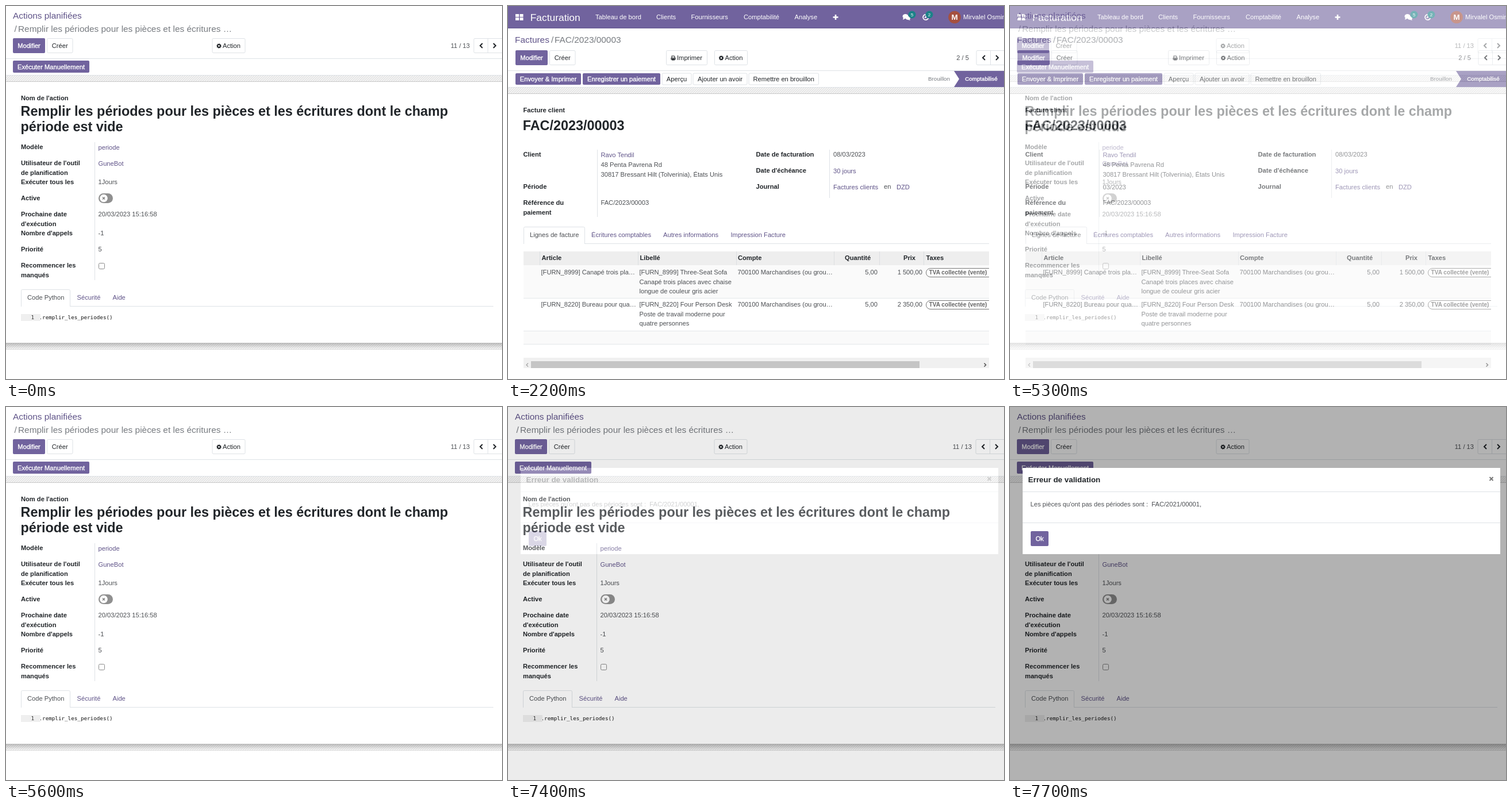
Write an HTML page that moves like this. It is 863 px wide and 649 px high and loops after 8000 ms.

```html
<!DOCTYPE html>
<html lang="fr">
<head>
<meta charset="utf-8">
<title>Actions planifiées</title>
<style>
html, body { margin: 0; width: 100%; height: 100%; overflow: hidden; background: #fff; }
svg { display: block; }
text { font: 11.15px "Liberation Sans", Arial, sans-serif; white-space: pre; }
.b { font-weight: 700; }
.crumb { font-size: 15.4px; }
.h1 { font-size: 23.4px; font-weight: 700; }
.app { font-size: 17.4px; }
.title { font-size: 13.4px; font-weight: 700; }
.small { font-size: 9.75px; }
.tiny { font-size: 8px; }
.tax { font-size: 10.1px; font-weight: 700; }
.code { font: 9.25px "DejaVu Sans Mono", monospace; }
.strong { stroke: #fff; stroke-width: .35px; }
.mid { text-anchor: middle; }
.end { text-anchor: end; }
</style>
</head>
<body>
<svg id="stage" width="863" height="649" viewBox="0 0 863 649"></svg>
<script>
const PURPLE = '#71639e', LINK = '#5f5388', INK = '#212529', BODY = '#4c4f53', EDGE = '#dee2e6', MUTED = '#777b80';

const text = (x, y, s, fill = BODY, cls = '') => `<text x="${x}" y="${y}" fill="${fill}" class="${cls}">${s}</text>`;
const label = (x, y, ...lines) => lines.map((s, i) => text(x, y + i * 17, s, INK, 'b')).join('');
const rect = (x, y, w, h, fill, more = '') => `<rect x="${x}" y="${y}" width="${w}" height="${h}" fill="${fill}" ${more}/>`;
const frame = (x, y, w, h, r = 2, stroke = EDGE) => rect(x + .5, y + .5, w - 1, h - 1, '#fff', `rx="${r}" stroke="${stroke}"`);
const hline = (x, y, w, c = EDGE) => rect(x, y, w, 1, c);
const vline = (x, y, h, c = EDGE) => rect(x, y, 1, h, c);
const path = (d, stroke, width = 1, fill = 'none') => `<path d="${d}" fill="${fill}" stroke="${stroke}" stroke-width="${width}"/>`;
const dot = (x, y, r, fill) => `<circle cx="${x}" cy="${y}" r="${r}" fill="${fill}"/>`;

function button(x, y, w, h, s, primary, shift = 0) {
  const box = primary ? rect(x, y, w, h, PURPLE, 'rx="2"') : frame(x, y, w, h);
  return box + text(x + w / 2 + shift, y + h / 2 + 4, s, primary ? '#fff' : INK, primary ? 'mid strong' : 'mid');
}

function gear(x, y) {
  return `<g fill="none" stroke="${INK}"><circle cx="${x}" cy="${y}" r="2.4" stroke-width="2"/>
    <circle cx="${x}" cy="${y}" r="3.6" stroke-width="1.2" stroke-dasharray="1.41 1.41"/></g>`;
}

function printer(x, y) {
  return path(`M${x - 2.5} ${y}v-3.5h4l1 1v2.5M${x - 3.5} ${y + 2.5}v-2.5h7v2.5zM${x - 2} ${y + 1.5}h4v2h-4z`, INK, 1.1);
}

// Toolbar shared by both pages: dx, y give its place.
function toolbar(dx, y, count) {
  const cy = y + 13;
  return button(12 + dx, y, 56, 26, 'Modifier', true) + button(71 + dx, y, 45.5, 26, 'Créer')
    + button(358.5 + dx / 2, y, 58, 26, 'Action', false, 5) + gear(370.5 + dx / 2, cy + .5)
    + text(807 + (dx ? -5 : 0), cy + 3.5, count, BODY, 'end')
    + frame(813.5 + dx, y, 60, 26) + vline(838 + dx, y, 26)
    + path(`M${829 + dx} ${cy - 4}l-4 4l4 4M${848 + dx} ${cy - 4}l4 4l-4 4`, INK, 2);
}

function tabs(x, y, w, right, names) {
  const [first, ...rest] = names;
  return hline(x, y + 29, right - x) + path(`M${x + .5} ${y + 30}v-27.5q0-2 2-2h${w - 5}q2 0 2 2v27.5`, EDGE, 1, '#fff')
    + text(x + 11, y + 18, first) + rest.map(([tx, s]) => text(tx, y + 18, s, LINK)).join('');
}

const backdrop = (y, h) => rect(0, y, 863, h, 'url(#weave)');

const actionPage = () => rect(0, 0, 863, 649, '#fff')
  + text(12, 22, 'Actions planifiées', LINK, 'crumb')
  + text(14.5, 45, '/', MUTED, 'crumb') + text(21, 45, 'Remplir les périodes pour les pièces et les écritures …', MUTED, 'crumb')
  + toolbar(0, 56, '11 / 13') + hline(0, 91, 863)
  + button(12, 95, 133, 21, 'Exécuter Manuellement', true)
  + hline(0, 120, 863) + backdrop(121, 10) + hline(0, 131, 863, '#c9c9c9')
  + label(26, 164, "Nom de l'action")
  + text(25.5, 190.5, 'Remplir les périodes pour les pièces et les écritures dont le champ', INK, 'h1')
  + text(25.5, 217.5, 'période est vide', INK, 'h1')
  + label(26, 249, 'Modèle') + label(26, 277, "Utilisateur de l'outil", 'de planification')
  + label(26, 310, 'Exécuter tous les') + label(26, 338, 'Active')
  + label(26, 366, 'Prochaine date', "d'exécution") + label(26, 399, "Nombre d'appels")
  + label(26, 427, 'Priorité') + label(26, 455, 'Recommencer les', 'manqués')
  + vline(154, 237, 240)
  + text(160.5, 250, 'periode', LINK) + text(160.5, 278, 'GuneBot', LINK)
  + text(160.5, 310, '1Jours') + text(160.5, 366, '20/03/2023 15:16:58')
  + text(160.5, 399, '-1') + text(160.5, 427, '5')
  + rect(161, 326, 25, 17, '#909090', 'rx="8.5"') + dot(170, 334.5, 6.8, '#fff')
  + path('M168 332.5l4 4m0-4l-4 4', '#808080', 1.5)
  + frame(161, 447, 11, 11, 2, '#8a8a8a')
  + tabs(26, 493, 86, 848, ['Code Python', [123.5, 'Sécurité'], [185.5, 'Aide']])
  + text(57.5, 545, '.remplir_les_periodes()', '#111', 'code')
  + rect(26, 536, 34, 12, '#efefef') + text(43.5, 545, '1', '#333', 'code')
  + backdrop(587, 11) + rect(0, 587, 863, 9, 'url(#shade)') + hline(0, 586, 863, '#bdbdbd') + hline(0, 597, 863, '#dcdcdc');

function navbar() {
  const items = [[152, 'Tableau de bord'], [258, 'Clients'], [318.5, 'Fournisseurs'], [410, 'Comptabilité'], [498.5, 'Analyse']];
  const badge = (x, n) => dot(x, 15, 6.5, '#1b8288') + text(x, 18, n, '#fff', 'tiny mid');
  return rect(0, 0, 863, 39, PURPLE) + hline(0, 38, 863, '#655890')
    + [14, 20].map(y => rect(13, y, 6, 5, '#fff') + rect(20.5, y, 6, 5, '#fff')).join('')
    + text(38.7, 25.5, 'Facturation', '#fff', 'app')
    + items.map(([x, s]) => text(x, 23, s, '#fff')).join('')
    + path('M565.5 19.5h9M570 15v9', '#fff', 2.6)
    + `<ellipse cx="691.5" cy="18" rx="5" ry="4" fill="#fff"/><ellipse cx="696" cy="21" rx="4" ry="3" fill="#fff"/>`
    + path('M688 20l-1 4l4-2zM698 22l2 3l-4-1z', 'none', 0, '#fff') + badge(703, 5)
    + path('M731.5 19.5a4.7 4.7 0 1 1-4.5-4.7M727 16.5v3.5h-2.5', '#fff', 1.7) + badge(733, 2)
    + dot(777, 19.5, 10.8, '#a5503f') + text(777, 24, 'M', '#fff', 'title mid')
    + text(792, 23, 'Mirvalel Osmin', '#fff');
}

function row(y, code, lines, price) {
  return text(57.5, y, code) + lines.map((s, i) => text(228.5, y + i * 16.5, s)).join('')
    + text(399.5, y, '700100 Marchandises (ou grou…') + text(643, y, '5,00', BODY, 'end') + text(721, y, price, BODY, 'end')
    + rect(727.5, y - 10.5, 125, 15, '#fff', 'rx="7.5" stroke="#777"') + text(732.5, y, 'TVA collectée (vente)', '#666', 'tax');
}

const invoicePage = () => rect(0, 0, 863, 649, '#fff') + navbar()
  + text(12, 64, 'Factures', LINK, 'crumb') + text(75, 64, '/', MUTED, 'crumb') + text(81, 64, 'FAC/2023/00003', MUTED, 'crumb')
  + toolbar(1, 77, '2 / 5') + button(275, 77, 72, 26, 'Imprimer', false, 5) + printer(287.5, 90.5)
  + hline(0, 112, 863)
  + button(13, 117, 114, 20, 'Envoyer &amp; Imprimer', true) + button(130, 117, 135, 20, 'Enregistrer un paiement', true)
  + button(267.5, 116.5, 52, 21, 'Aperçu') + button(321.5, 116.5, 95, 21, 'Ajouter un avoir') + button(418.5, 116.5, 122.5, 21, 'Remettre en brouillon')
  + text(750, 130, 'Brouillon', MUTED, 'small mid')
  + path('M776 113H863V141H776L785 127z', 'none', 0, PURPLE) + text(823.5, 130, 'Comptabilisé', '#fff', 'small mid strong')
  + hline(0, 141, 863) + backdrop(142, 10) + hline(0, 152, 863, '#c9c9c9')
  + label(26.5, 185, 'Facture client') + text(25.7, 216, 'FAC/2023/00003', INK, 'h1')
  + label(26.5, 262, 'Client') + `<g id="period">${label(26.5, 318, 'Période')}</g>` + label(26.5, 346, 'Référence du', 'paiement')
  + vline(155, 250, 117)
  + text(161.5, 262.5, 'Ravo Tendil', LINK) + text(161.5, 280, '48 Penta Pavrena Rd')
  + text(161.5, 297, '30817 Bressant Hilt (Tolverinia), États Unis')
  + `<g id="value">${text(161.5, 318.5, '03/2023')}</g>` + text(161.5, 346, 'FAC/2023/00003')
  + label(431.5, 262, 'Date de facturation') + label(431.5, 290, "Date d'échéance") + label(431.5, 318, 'Journal')
  + vline(559, 250, 84)
  + text(566, 262, '08/03/2023') + text(566, 290.5, '30 jours', LINK)
  + text(566, 318.5, 'Factures clients', LINK) + text(654, 318, 'en') + text(676, 318.5, 'DZD', LINK)
  + tabs(27, 384, 107, 837, ['Lignes de facture', [145, 'Écritures comptables'], [270, 'Autres informations'], [387.5, 'Impression Facture']])
  + rect(27, 427, 810, 24, '#eeeeee') + [55, 226, 397, 567, 646, 723].map(x => vline(x, 427, 24, '#dcdfe2')).join('')
  + label(58.5, 442, 'Article') + label(229.5, 442, 'Libellé') + label(400, 442, 'Compte')
  + label(586, 442, 'Quantité') + label(688, 442, 'Prix') + label(727.5, 442, 'Taxes')
  + rect(27, 451, 810, 57, '#fafafa') + rect(27, 565, 810, 23, '#fafafa') + [508, 565, 588].map(y => hline(27, y, 810, '#e4e7ea')).join('')
  + row(467, '[FURN_8999] Canapé trois pla…', ['[FURN_8999] Three-Seat Sofa', 'Canapé trois places avec chaise', 'longue de couleur gris acier'], '1 500,00')
  + row(523, '[FURN_8220] Bureau pour qua…', ['[FURN_8220] Four Person Desk', 'Poste de travail moderne pour', 'quatre personnes'], '2 350,00')
  + rect(837, 420, 26, 180, '#fff')
  + rect(27, 612, 810, 18, '#f0f0f0') + rect(40, 618, 676, 12, '#c5c5c5')
  + path('M35 621.5l-3 3l3 3', '#a5a5a5', 1.3) + path('M828.5 621.5l3 3l-3 3', '#505050', 1.5);

const dialog = () => rect(0, 0, 863, 649, '#000', 'opacity=".3"') + rect(22, 106, 831, 150, '#fff')
  + text(31.5, 131, 'Erreur de validation', INK, 'title') + path('M834.5 122l6 6m0-6l-6 6', '#777', 2)
  + hline(22, 147, 831) + text(35.5, 173, "Les pièces qu'ont pas des périodes sont :\u00a0 FAC/2021/00001,")
  + hline(22, 201, 831) + button(36, 216, 31, 26, 'Ok', true);

const stage = document.getElementById('stage');
stage.innerHTML = `<defs>
  <pattern id="weave" width="4" height="4" patternUnits="userSpaceOnUse">
    ${rect(0, 0, 4, 4, '#f3f3f3')}${[0, 1, 2, 3].map(i => rect(i, (i * 3) % 4, 1, 1, '#d9d9d9')).join('')}
  </pattern>
  <linearGradient id="shade" x2="0" y2="1"><stop stop-opacity=".2"/><stop offset="1" stop-opacity="0"/></linearGradient>
</defs>
<g>${actionPage()}</g>
<rect id="ring" x="9" y="92" width="140" height="28" fill="none" stroke="#f00" stroke-width="2"/>
<g id="invoice">${invoicePage()}</g>
<g id="dialog">${dialog()}</g>`;

const $ = id => document.getElementById(id);
const [ring, invoice, period, value, popup] = ['ring', 'invoice', 'period', 'value', 'dialog'].map($);
const periodText = period.firstElementChild;

// Fades advance in 100 ms steps; blinks are two flashes of 200 ms.
const fade = (t, start, steps) => Math.max(0, Math.min(steps, Math.floor((t - start) / 100) + 1)) / steps;
const blink = (t, start) => t >= start && t < start + 800 && Math.floor((t - start) / 200) % 2 === 0;

function draw(now) {
  const t = now % 8000;
  ring.setAttribute('opacity', blink(t, 1000) || blink(t, 6600) ? 1 : 0);
  invoice.setAttribute('opacity', fade(t, 1800, 5) - fade(t, 5200, 5));
  periodText.setAttribute('fill', blink(t, 3200) ? '#f00' : INK);
  value.setAttribute('opacity', fade(t, 4000, 3));
  popup.setAttribute('opacity', fade(t, 7400, 4));
}

const start = performance.now();
function tick() {
  draw(performance.now() - start);
  requestAnimationFrame(tick);
}
tick();
</script>
</body>
</html>
```
